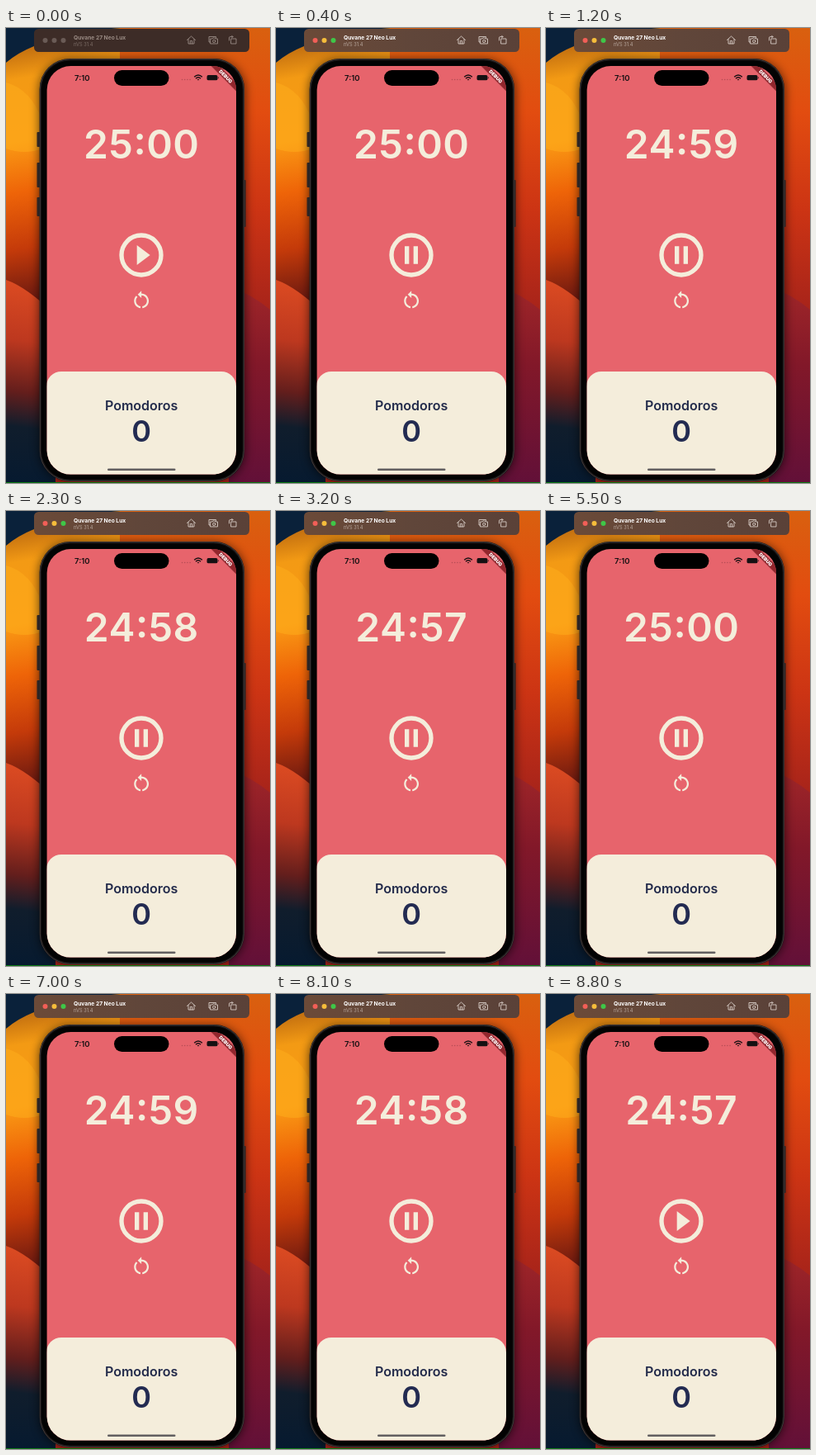
Recreate the animation shown at these times as an HTML page. Size 320 by 551 pixels, loop 8900 ms.

```html
<!DOCTYPE html>
<html lang="en">
<head>
<meta charset="utf-8">
<title>Timer</title>
<style>
  html, body { margin: 0; width: 100%; height: 100%; overflow: hidden; background: #071a2c; }
  svg { display: block; width: 100%; height: 100%; }
  text { font-family: Inter, "Liberation Sans", sans-serif; font-weight: 600; }
  .mid { text-anchor: middle; }
  .line { fill: none; stroke: #d6cbc4; stroke-width: .9; stroke-linejoin: round; stroke-linecap: round; }
  #clock { font-size: 48px; letter-spacing: .5px; font-feature-settings: "calt"; }
</style>
</head>
<body>
<svg viewBox="0 0 320 551">
  <defs>
    <linearGradient id="leftGlow" gradientUnits="userSpaceOnUse" x1="0" y1="20" x2="50" y2="325">
      <stop offset="0" stop-color="#b8660f"/>
      <stop offset=".14" stop-color="#f39a14"/>
      <stop offset=".38" stop-color="#fa9a14"/>
      <stop offset=".58" stop-color="#ee6408"/>
      <stop offset=".8" stop-color="#c43a0a"/>
      <stop offset="1" stop-color="#6e1a10"/>
    </linearGradient>
    <linearGradient id="leftPetal" gradientUnits="userSpaceOnUse" x1="30" y1="305" x2="0" y2="551">
      <stop offset="0" stop-color="#dd4c22"/>
      <stop offset=".3" stop-color="#bd381f"/>
      <stop offset=".55" stop-color="#641e1c"/>
      <stop offset=".72" stop-color="#101d2c"/>
      <stop offset="1" stop-color="#061a30"/>
    </linearGradient>
    <linearGradient id="rightGlow" gradientUnits="userSpaceOnUse" x1="0" y1="0" x2="0" y2="340">
      <stop offset="0" stop-color="#d9600f"/>
      <stop offset=".3" stop-color="#e24c10"/>
      <stop offset=".65" stop-color="#cc3414"/>
      <stop offset="1" stop-color="#a8241a"/>
    </linearGradient>
    <linearGradient id="rightPetal" x1="0" y1="0" x2="0" y2="1">
      <stop offset="0" stop-color="#a02628"/>
      <stop offset=".4" stop-color="#821829"/>
      <stop offset="1" stop-color="#621038"/>
    </linearGradient>
    <linearGradient id="barFill">
      <stop offset="0" stop-color="#6b4a38"/>
      <stop offset=".5" stop-color="#60463a"/>
      <stop offset="1" stop-color="#5a4138"/>
    </linearGradient>
    <filter id="blur" x="-20%" y="-20%" width="140%" height="140%"><feGaussianBlur stdDeviation="6"/></filter>
    <clipPath id="screen"><rect x="49.6" y="46" width="229.4" height="494.6" rx="29"/></clipPath>
  </defs>

  <!-- wallpaper -->
  <rect width="320" height="551" fill="url(#rightGlow)"/>
  <path d="M0 0H138V60H60V345H0Z" fill="url(#leftGlow)"/>
  <path d="M0 66Q30 74 44 112V146Q22 154 0 146Z" fill="#ffb01c" opacity=".5"/>
  <path d="M0 0H138Q62 6 34 22Q14 30 0 42Z" fill="#0a213a"/>
  <path d="M0 305Q26 314 60 348V551H0Z" fill="url(#leftPetal)"/>
  <path d="M270 312Q300 324 320 341V551H270Z" fill="url(#rightPetal)"/>
  <rect x="40" y="38" width="250" height="512" rx="38" opacity=".6" filter="url(#blur)"/>
  <rect y="550" width="320" height="1" fill="#0c7a14"/>

  <!-- title bar -->
  <rect id="barBack" x="34" y="1" width="261" height="28" rx="5.5"/>
  <circle class="dot" cx="47.5" cy="15" r="3"/>
  <circle class="dot" cx="58.5" cy="15" r="3"/>
  <circle class="dot" cx="69.5" cy="15" r="3"/>
  <text id="name" x="82" y="13.8" font-size="6.7" style="font-weight:700">Quvane 27 Neo Lux</text>
  <text id="system" x="82" y="21.8" font-size="5.7" style="font-weight:400">nVS 31.4</text>
  <g class="line">
    <path d="M219.5 14.5L224.5 10L229.5 14.5M221 13.5V19H228V13.5M223.3 19V15.6H225.7V19"/>
    <path d="M247.5 17H246V10.5H254.5V12M248 13H250L250.8 12H253.2L254 13H256.5V19H248Z"/>
    <circle cx="252.2" cy="15.9" r="1.6"/>
    <path d="M273 13H279V19H273ZM270.5 15V11.8Q270.5 10.6 271.8 10.6H275M273.7 9.3L275 10.6L273.7 11.9"/>
  </g>

  <!-- phone body -->
  <g fill="#2c2525">
    <rect x="37.5" y="126" width="5" height="18" rx="1"/>
    <rect x="37.5" y="163" width="5" height="30" rx="1"/>
    <rect x="37.5" y="205" width="5" height="23" rx="1"/>
    <rect x="287" y="184" width="3.6" height="57" rx="1"/>
  </g>
  <rect x="40.6" y="37" width="248.4" height="512" rx="37" fill="#161314"/>
  <rect x="41.3" y="37.7" width="247" height="510.6" rx="36.4" fill="none" stroke="#4c4443" stroke-width=".8"/>
  <rect x="43" y="39.4" width="243.6" height="507.2" rx="34.8" fill="#030303"/>

  <g clip-path="url(#screen)">
    <rect x="49" y="46" width="230" height="495" fill="#e7646c"/>
    <path d="M49 541V434A18 18 0 0 1 67 416H261A18 18 0 0 1 279 434V541Z" fill="#f4eddb"/>
    <g transform="translate(266.3 58.7) rotate(45)">
      <rect x="-30" y="-3.8" width="60" height="7.6" fill="#5c2026" opacity=".4"/>
      <rect x="-30" y="-3.2" width="60" height="6.4" fill="#92262d"/>
      <text class="mid" y="2.1" font-size="5.8" fill="#fff" style="font-weight:900">DEBUG</text>
    </g>
  </g>

  <!-- status bar -->
  <rect x="131" y="51" width="66.5" height="19" rx="9.5" fill="#000"/>
  <text x="83" y="63.8" font-size="9.6" fill="#161012">7:10</text>
  <g fill="#b64e56">
    <circle cx="213.5" cy="62.5" r=".8"/><circle cx="216.7" cy="62.5" r=".8"/>
    <circle cx="219.9" cy="62.5" r=".8"/><circle cx="223.1" cy="62.5" r=".8"/>
  </g>
  <g fill="none" stroke="#161012" stroke-width="1.4">
    <path d="M228.2 59.3Q233 54.6 237.8 59.3M230 61.2Q233 58.3 236 61.2"/>
    <path d="M231.6 62L233 63.6L234.4 62Z" fill="#161012" stroke="none"/>
  </g>
  <rect x="243.5" y="57" width="13" height="6.3" rx="1.9" fill="#161012"/>
  <rect x="257" y="59" width=".9" height="2.2" rx=".4" fill="#5c2a30"/>

  <!-- app -->
  <text id="clock" class="mid" x="164.3" y="158" fill="#f4eddb"></text>
  <g fill="#f4eddb">
    <circle id="ripple"/>
    <g transform="translate(132 243) scale(2.6667)">
      <circle cx="12" cy="12" r="9" fill="none" stroke="#f4eddb" stroke-width="2"/>
      <path id="play" d="M10 16.5l6-4.5-6-4.5z"/>
      <path id="pause" d="M9 16h2V8H9zM13 16h2V8h-2z"/>
    </g>
    <path transform="translate(150.8 316) scale(1.111)" d="M12 5V2L8 6l4 4V7c3.31 0 6 2.69 6 6 0 2.97-2.17 5.43-5 5.91v2.02c3.95-.49 7-3.85 7-7.93 0-4.42-3.58-8-8-8zM6 13c0-1.65.67-3.15 1.76-4.24L6.34 7.34C4.9 8.79 4 10.79 4 13c0 4.08 3.05 7.44 7 7.93v-2.02c-2.83-.48-5-2.94-5-5.91z"/>
  </g>
  <text class="mid" x="164.2" y="463" font-size="16" fill="#232b4b">Pomodoros</text>
  <text class="mid" x="164.2" y="501.3" font-size="36" fill="#232b52">0</text>
  <rect x="123" y="533.4" width="82.5" height="2.6" rx="1.3" fill="#625f60"/>
</svg>
<script>
const LOOP = 8900;
const FOCUS = 100;
const RESET = 4200;
const RUNS = [[150, 3500], [5200, 8400]];
const LIGHTS = ['#f25f57', '#f6bd3b', '#3fc748'];

const $ = id => document.getElementById(id);
const dots = document.querySelectorAll('.dot');
const icons = document.querySelector('.line');
const show = (el, on) => el.setAttribute('visibility', on ? 'visible' : 'hidden');
const fill = (el, color) => el.setAttribute('fill', color);

function drawBar(active) {
  fill($('barBack'), active ? 'url(#barFill)' : '#3d2c27');
  fill($('name'), active ? '#fff' : '#9a8b84');
  fill($('system'), active ? '#b9a89e' : '#7c6d67');
  dots.forEach((dot, i) => fill(dot, active ? LIGHTS[i] : '#6a5b56'));
  icons.setAttribute('opacity', active ? 1 : .6);
}

function drawTimer(t) {
  const [start, end] = RUNS[t < RESET ? 0 : 1];
  const running = t >= start && t < end;
  const elapsed = Math.max(0, Math.min(t, end) - start);
  const left = 1500 - Math.floor(elapsed / 1000);
  const pad = n => String(n).padStart(2, '0');
  $('clock').textContent = pad(Math.floor(left / 60)) + ':' + pad(left % 60);
  show($('play'), !running);
  show($('pause'), running);
}

function drawRipple(t) {
  const p = (t - RESET) / 400;
  const on = p >= 0 && p < 1;
  show($('ripple'), on);
  if (!on) return;
  const ripple = { cx: 167.5, cy: 331.5, r: 4 + 10 * p, opacity: .5 * (1 - p) };
  for (const key in ripple) $('ripple').setAttribute(key, ripple[key]);
}

function render(t) {
  drawBar(t >= FOCUS);
  drawTimer(t);
  drawRipple(t);
}

const origin = performance.now();
function tick() {
  render((performance.now() - origin) % LOOP);
  requestAnimationFrame(tick);
}
tick();
</script>
</body>
</html>
```
